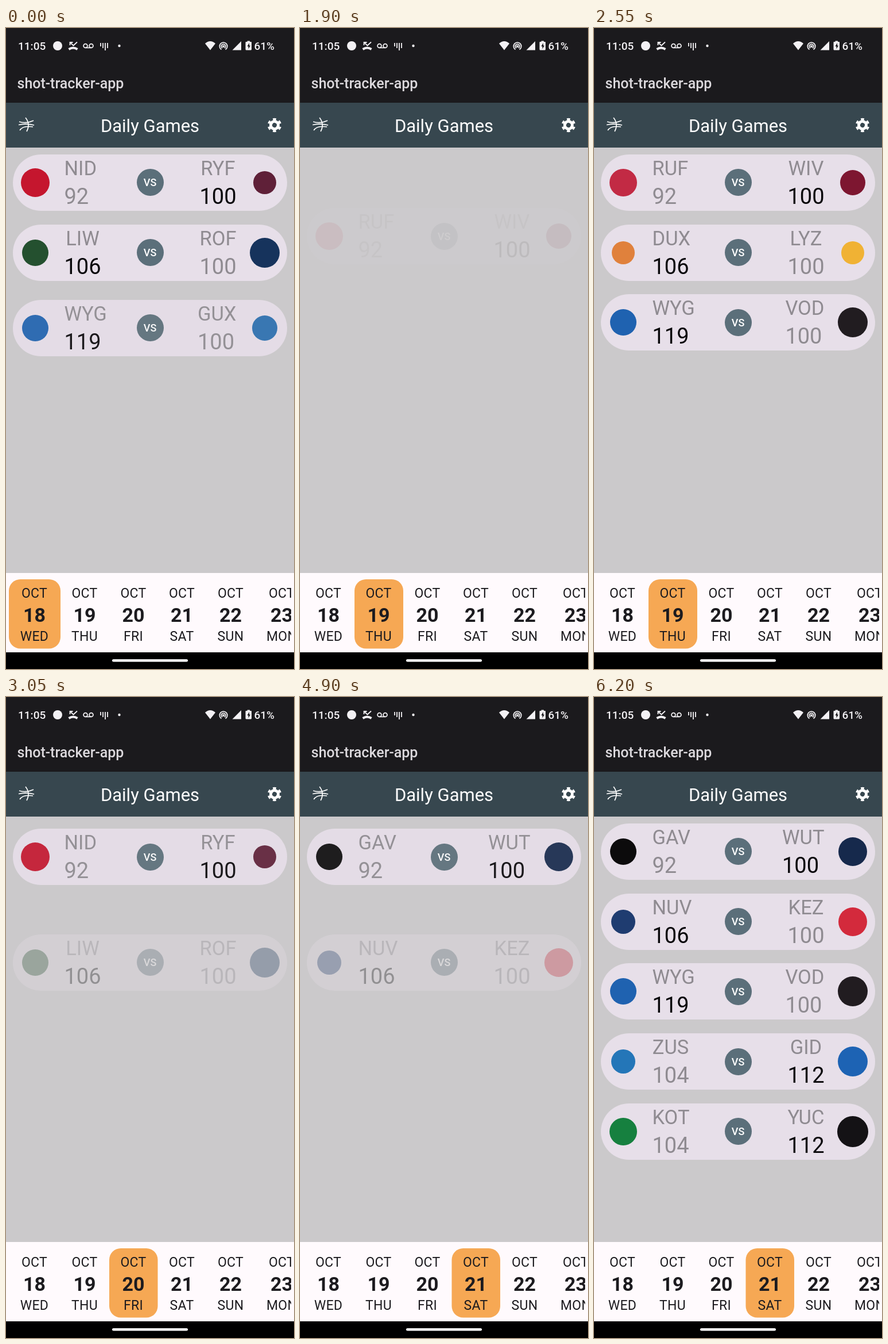
An HTML page that plays this animation: 502x1115 px, repeating every 7.45 s.

```html
<!DOCTYPE html>
<html lang="en">
<head>
<meta charset="utf-8">
<title>Daily Games</title>
<style>
html, body { margin: 0; width: 502px; height: 1115px; overflow: hidden; background: #cbc9cb; font-family: Roboto, sans-serif; }
svg { position: absolute; left: 0; top: 0; }
.row { position: absolute; left: 12px; width: 478px; height: 98px; border-radius: 49px; background: #e7dfe9; color: #8f8b91; }
.row > * { position: absolute; }
.team { top: 0; line-height: 49px; }
.team div { font-size: 34.5px; text-align: center; }
.team p { margin: 0; font-size: 38px; }
.team .win { color: #08070a; }
.home { left: 89.5px; }
.away { right: 88.5px; }
.badge { top: 49px; border-radius: 50%; transform: translate(-50%, -50%); }
.vs { left: 239px; top: 25.5px; width: 47px; line-height: 47px; margin-left: -23.5px; border-radius: 50%; background: #5b6f7a; color: #fff; font-size: 18px; font-weight: 500; text-align: center; }
</style>
</head>
<body>
<svg id="chrome" width="502" height="1115" viewBox="0 0 502 1115">
  <path fill="#1b1a1d" d="M0 0h502v130H0z"/>
  <path fill="#37474f" d="M0 130h502v78H0z"/>
  <path fill="#fffafd" d="M0 948h502v138H0z"/>
  <path d="M0 1086h502v29H0z"/>
  <rect x="185" y="1098" width="132" height="4.5" rx="2.2" fill="#fff"/>
  <g fill="#f3f1f4" font-size="19" font-weight="500">
    <text x="21" y="37.5">11:05</text>
    <text x="432.5" y="37.5">61%</text>
    <circle cx="90" cy="31" r="8"/>
    <circle cx="197.5" cy="31" r="2.2"/>
    <path d="M347 27q9-8 18 0l-9 11.5zM410 23v15.5h-15.5z"/>
    <path d="M420.5 24v-1.5h4.5v1.5h2q1 0 1 1v12q0 1.5-1.5 1.5h-7.5q-1.5 0-1.5-1.5v-12q0-1 1-1z"/>
    <path fill="#1b1a1d" d="M424 26l-3.5 6h2v4.5l3.5-6h-2z"/>
    <circle cx="379" cy="32" r="2"/>
  </g>
  <g fill="none" stroke="#f3f1f4" stroke-width="1.8">
    <path d="M111.5 30v-5h5M112 25.5l5.5 5 6.5-6"/>
    <path stroke-width="4" d="M109.5 37q7.5-5 15 0"/>
    <circle cx="138.5" cy="31" r="3.4"/>
    <circle cx="148.5" cy="31" r="3.4"/>
    <path d="M138.5 34.4h10M165 26v6M169 26v9M173 26v13M177 26v9"/>
    <path d="M375.5 37.5a6.7 6.7 0 1 1 7 0M377 35a3.7 3.7 0 1 1 4 0"/>
  </g>
  <text x="19.5" y="105" font-size="25" font-weight="500" fill="#dcd9dd">shot-tracker-app</text>
  <text x="251" y="181" font-size="31" text-anchor="middle" fill="#fff">Daily Games</text>
  <path d="M23 163q12 4 25-2M22 168.5q14-3 27 .5M24 178q6-9 23-6M34 156q9 11 2 24" fill="none" stroke="#fff" stroke-width="1.7"/>
  <g transform="translate(468 169) rotate(30)" fill="none" stroke="#fff">
    <circle r="6.5" stroke-width="5"/>
    <circle r="10.2" stroke-width="4" pathLength="12" stroke-dasharray="1 1" stroke-dashoffset=".5"/>
  </g>
  <rect id="mark" y="959" height="120.5" rx="20" fill="#f6a854"/>
  <clipPath id="strip"><path d="M0 948h497v138H0z"/></clipPath>
  <g id="dates" clip-path="url(#strip)" text-anchor="middle" fill="#1c1b1f"></g>
</svg>
<div id="list"></div>
<script>
const LOOP = 7450, STEP = 50, ENTER = 250, STAGGER = 100, RISE = 100;
const $ = id => document.getElementById(id);

// code: [badge colour, badge radius]
const teams = {
  NID: ['#c5162e', 25], RYF: ['#5f2038', 20], LIW: ['#24502f', 23], ROF: ['#16335c', 26],
  WYG: ['#1f62b0', 23], GUX: ['#2a6fb0', 22], RUF: ['#c22a44', 24], WIV: ['#7d1630', 22],
  DUX: ['#e0813c', 20], LYZ: ['#f0b234', 20], VOD: ['#211c20', 26], GAV: ['#0c0b0c', 23],
  WUT: ['#16294c', 25], NUV: ['#1f3c70', 21], KEZ: ['#d32a3c', 25], ZUS: ['#2476b8', 21],
  GID: ['#1d63b4', 26], KOT: ['#16803f', 24], YUC: ['#141215', 27]
};
const scores = [[92, 100], [106, 100], [119, 100], [104, 112], [104, 112]];
const early = ['NID RYF', 'LIW ROF', 'WYG GUX'];

// at: tap takes effect, enter: first card starts to rise
const days = [
  { at: 0, enter: -395, games: early },
  { at: 1750, enter: 1855, games: ['RUF WIV', 'DUX LYZ', 'WYG VOD'] },
  { at: 2800, enter: 2855, games: early },
  { at: 4600, enter: 4705, games: ['GAV WUT', 'NUV KEZ', 'WYG VOD', 'ZUS GID', 'KOT YUC'] }
];
const edges = [5, 95, 180, 264.5, 349];
const centers = [49.5, 137, 222, 306.5, 391.5, 480.5];

$('dates').innerHTML = ['WED', 'THU', 'FRI', 'SAT', 'SUN', 'MON'].map((name, i) => {
  const small = (y, s) => `<text x="${centers[i]}" y="${y}" font-size="23" letter-spacing=".3">${s}</text>`;
  return small(990.5, 'OCT') + small(1066, name) +
    `<text x="${centers[i]}" y="1032.5" font-size="34" font-weight="700">${18 + i}</text>`;
}).join('');

function badge(code, x) {
  const [color, r] = teams[code];
  return `<i class="badge" style="left:${x}px;width:${2 * r}px;height:${2 * r}px;background:${color}"></i>`;
}

function team(side, code, score, other) {
  return `<div class="team ${side}"><div>${code}</div><p class="${score > other ? 'win' : ''}">${score}</p></div>`;
}

function card(game, i) {
  const [home, away] = game.split(' '), [a, b] = scores[i];
  return `<div class="row">${badge(home, 39)}${team('home', home, a, b)}<b class="vs">VS</b>` +
    `${team('away', away, b, a)}${badge(away, 439)}</div>`;
}

function easeInOut(u) {
  if (u <= 0) return 0;
  if (u >= 1) return 1;
  return u < .5 ? 2 * u * u : 1 - 2 * (1 - u) ** 2;
}

let shown = -1;

function select(n) {
  shown = n;
  $('list').innerHTML = days[n].games.map(card).join('');
  $('mark').setAttribute('x', edges[n]);
  $('mark').setAttribute('width', edges[n + 1] - edges[n]);
}

function draw(now) {
  const t = Math.floor(now % LOOP / STEP) * STEP;
  const n = days.filter(d => d.at <= t).length - 1;
  if (n !== shown) select(n);
  [...$('list').children].forEach((row, i) => {
    const p = easeInOut((t - days[n].enter - i * STAGGER) / ENTER);
    row.style.top = 219.7 + i * 121.8 + RISE * (1 - p) + 'px';
    row.style.opacity = p;
  });
}

let start;
function tick(now) {
  start ??= now;
  draw(now - start);
  requestAnimationFrame(tick);
}
draw(0);
requestAnimationFrame(tick);
</script>
</body>
</html>
```
